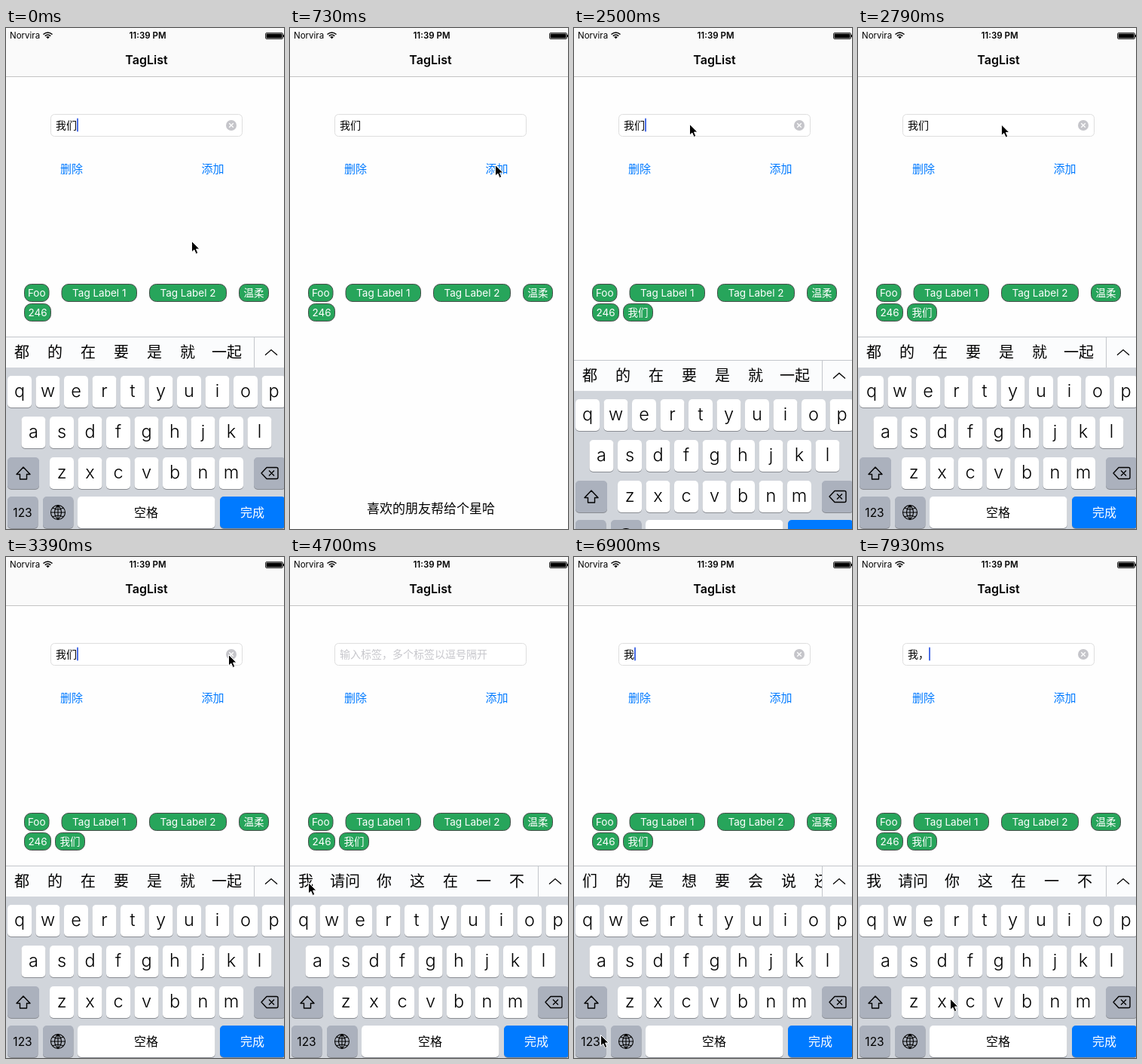
Animation of 369x664 px, one loop 8000 ms. Source, as an HTML page:

```html
<!DOCTYPE html>
<html lang="zh">
<head>
<meta charset="utf-8">
<title>TagList</title>
<style>
html, body { margin: 0; width: 100%; height: 100%; overflow: hidden; background: #fefefe; }
svg { display: block; width: 369px; height: 664px; font-family: Inter, "Noto Sans CJK SC", "Noto Sans CJK", sans-serif; }
</style>
</head>
<body>
<svg id="stage" viewBox="0 0 369 664"></svg>
<script>
const LOOP = 8000, STEP = 146.85;
const BLUE = '#007aff', GREY = '#abb1bd';
const stage = document.getElementById('stage');

const text = (s, x, y, size, fill = '#000', anchor = 'middle', weight = 400) =>
  `<text x="${x}" y="${y}" font-size="${size}" fill="${fill}" text-anchor="${anchor}" font-weight="${weight}">${s}</text>`;
const rect = (x, y, w, h, fill, r = 0, extra = '') =>
  `<rect x="${x}" y="${y}" width="${w}" height="${h}" rx="${r}" fill="${fill}" ${extra}/>`;
const line = (d, color = '#000', w = 1.3, extra = '') =>
  `<path d="${d}" fill="none" stroke="${color}" stroke-width="${w}" ${extra}/>`;

// Keyboard
const cap = (x, y, w, fill = '#fff') => rect(x, y + 1, w, 42, '#898c92', 5) + rect(x, y, w, 42, fill, 5);
const keyRow = (chars, x, y, pitch = 37.5, w = 32) => [...chars].map((c, i) =>
  cap(x + i * pitch, y, w) + text(c, x + i * pitch + w / 2, y + 28, 23.5, '#000', 'middle', 300)).join('');

const letters = keyRow('qwertyuiop', 2, 461) + keyRow('asdfghjkl', 20.5, 515) + keyRow('zxcvbnm', 58, 569) +
  cap(2, 569, 42, GREY) + line('M23 582 L32 591.5 H27.5 V598 H18.5 V591.5 H14 Z', '#000', 1.4, 'stroke-linejoin="round"') +
  cap(2, 621, 40.5, GREY) + text('123', 22, 648, 15.5);
const symbols = keyRow('1234567890', 2, 461) + keyRow('-/:;()¥@“”', 2, 515) + keyRow('。，、?!.', 58, 569, 43.75, 38) +
  cap(2, 569, 42, GREY) + text('#+=', 23, 595, 15) +
  cap(2, 621, 40.5, GREY) + text('拼音', 22, 648, 15.5);
const common = cap(329, 569, 42, GREY) +
  line('M339 590 L346 582.5 H359 Q361 582.5 361 584.5 V595.5 Q361 597.5 359 597.5 H346 Z M349 586.5 L356 593.5 M356 586.5 L349 593.5', '#000', 1.4, 'stroke-linejoin="round"') +
  cap(49, 621, 40.5, GREY) +
  line('M59.5 642 a9.5 9.5 0 1 0 19 0 a9.5 9.5 0 1 0 -19 0 H78.5 M69 632.5 V651.5 M69 632.5 Q60 642 69 651.5 Q78 642 69 632.5 M62 636 Q69 640 76 636 M62 648 Q69 644 76 648', '#000', 1.1) +
  cap(95, 621, 182.5) + text('空格', 186, 648, 16) +
  cap(284, 621, 87, BLUE) + text('完成', 327, 648, 16, '#fff');

function candidates(words) {
  let x = -1;
  return words.split(' ').map(s => {
    const w = s.length > 1 ? 60 : 44;
    x += w;
    return text(s, x - w / 2, 437, 20);
  }).join('');
}

const keyboard = (dy, words, numeric) => `<g transform="translate(0 ${dy})">` +
  rect(0, 409, 369, 255, '#d1d5db') + rect(0, 409, 369, 41, '#fbfcfd') + rect(0, 409, 369, 1, '#c3c6cb') +
  `<clipPath id="bar"><rect y="409" width="329" height="41"/></clipPath><g clip-path="url(#bar)">${candidates(words)}</g>` +
  rect(329, 409, 1, 41, '#c3c6cb') + line('M344 433.5 L352 426.5 L360 433.5') +
  (numeric ? symbols : letters) + common + '</g>';

// Page
const tag = (s, x, y, w) =>
  rect(x + .5, y + .5, w - 1, 23, '#27a55b', 9, 'stroke="#454c48"') + text(s, x + w / 2, y + 17, 13.5, '#fff');

const page = rect(0, 0, 369, 664, '#fefefe') + rect(0, 0, 369, 64, '#fafafa') + rect(0, 64, 369, 1, '#c4c4c4') +
  text('Norvira', 5, 14, 11.5, '#000', 'start') +
  line('M49.5 8.5 Q55.5 3.5 61.5 8.5 M51.8 10.6 Q55.5 7.4 59.2 10.6', '#000', 1.6) +
  '<path d="M53.2 12 Q55.5 10.2 57.8 12 L55.5 14.3 Z"/>' +
  text('11:39 PM', 188, 14, 11.5, '#000', 'middle', 600) +
  rect(344.5, 6.5, 23, 8, 'none', 1.5, 'stroke="#000" stroke-width=".8"') + rect(345.5, 7.5, 21, 6, '#000', .5) + rect(368, 9, 1, 3, '#000') +
  text('TagList', 186.5, 48, 16, '#000', 'middle', 600) +
  rect(59.5, 114.5, 254, 29, '#fff', 5, 'stroke="#dedede"') +
  text('删除', 87, 191.5, 15, BLUE) + text('添加', 274.5, 191.5, 15, BLUE) +
  tag('Foo', 24, 339, 33.5) + tag('Tag Label 1', 73.5, 339, 100.5) + tag('Tag Label 2', 190, 339, 103) +
  tag('温柔', 309, 339, 40) + tag('246', 24, 365, 36) +
  text('喜欢的朋友帮给个星哈', 187, 643, 17);

const clearButton = '<circle cx="299" cy="129" r="7" fill="#c5c5ca"/>' +
  line('M296.2 126.2 L301.8 131.8 M301.8 126.2 L296.2 131.8', '#fff');

// Pointer stops: time, x, y
const stops = [
  [0, 246, 282], [440, 246, 282], [730, 272, 181], [1470, 272, 181], [2200, 153, 127], [2645, 153, 127],
  [3080, 295, 129], [3530, 295, 129], [4400, 24, 431], [5000, 24, 431], [5900, 78, 600], [6600, 35, 633],
  [7200, 35, 633], [7780, 122, 585], [LOOP, 122, 585]
];
function pointer(t) {
  const i = stops.findIndex(s => s[0] > t);
  const [t0, x0, y0] = stops[i - 1], [t1, x1, y1] = stops[i];
  const p = (t - t0) / (t1 - t0), e = p * p * (3 - 2 * p);
  return `<path transform="translate(${x0 + (x1 - x0) * e} ${y0 + (y1 - y0) * e})" stroke="#fff" stroke-linejoin="round"
    d="M.5 .5 V15 L3.8 12 L6.2 17.5 L8.8 16.3 L6.5 11 H11 Z"/>`;
}

const easeOut = p => 1 - (1 - Math.min(1, Math.max(0, p))) ** 3;

function draw(t) {
  const cleared = t > 3520, picked = t > 4840, typed = t > 7920;
  const value = typed ? '我，' : picked ? '我' : cleared ? '' : '我们';
  const words = typed || cleared && !picked ? '我 请问 你 这 在 一 不'
    : picked ? '们 的 是 想 要 会 说 还' : '都 的 在 要 是 就 一起';
  const editing = t < 100 || t > 2294;
  const caret = editing && (t - (picked ? 4840 : 0)) % 1000 < 600;
  const drop = 257 * (t < 2294 ? easeOut((t - 100) / 400) : 1 - easeOut((t - 2294) / 400));

  stage.innerHTML = page +
    (t > 1020 ? tag('我们', 65, 365, 40) : '') +
    (value ? text(value, 66, 134, 14, '#000', 'start') : text('输入标签，多个标签以逗号隔开', 66, 134, 14, '#c7c7cc', 'start')) +
    (caret ? rect(66 + value.length * 14, 119.5, 2, 18, '#4a6de5', 1) : '') +
    (editing && value ? clearButton : '') +
    keyboard(drop, words, t > 7040 && !typed) + pointer(t);
}

// The screen refreshes in even steps
let last = -1;
function tick() {
  const step = Math.floor((performance.now() % LOOP + 5) / STEP);
  if (step !== last) draw((last = step) * STEP);
  requestAnimationFrame(tick);
}
tick();
</script>
</body>
</html>
```
